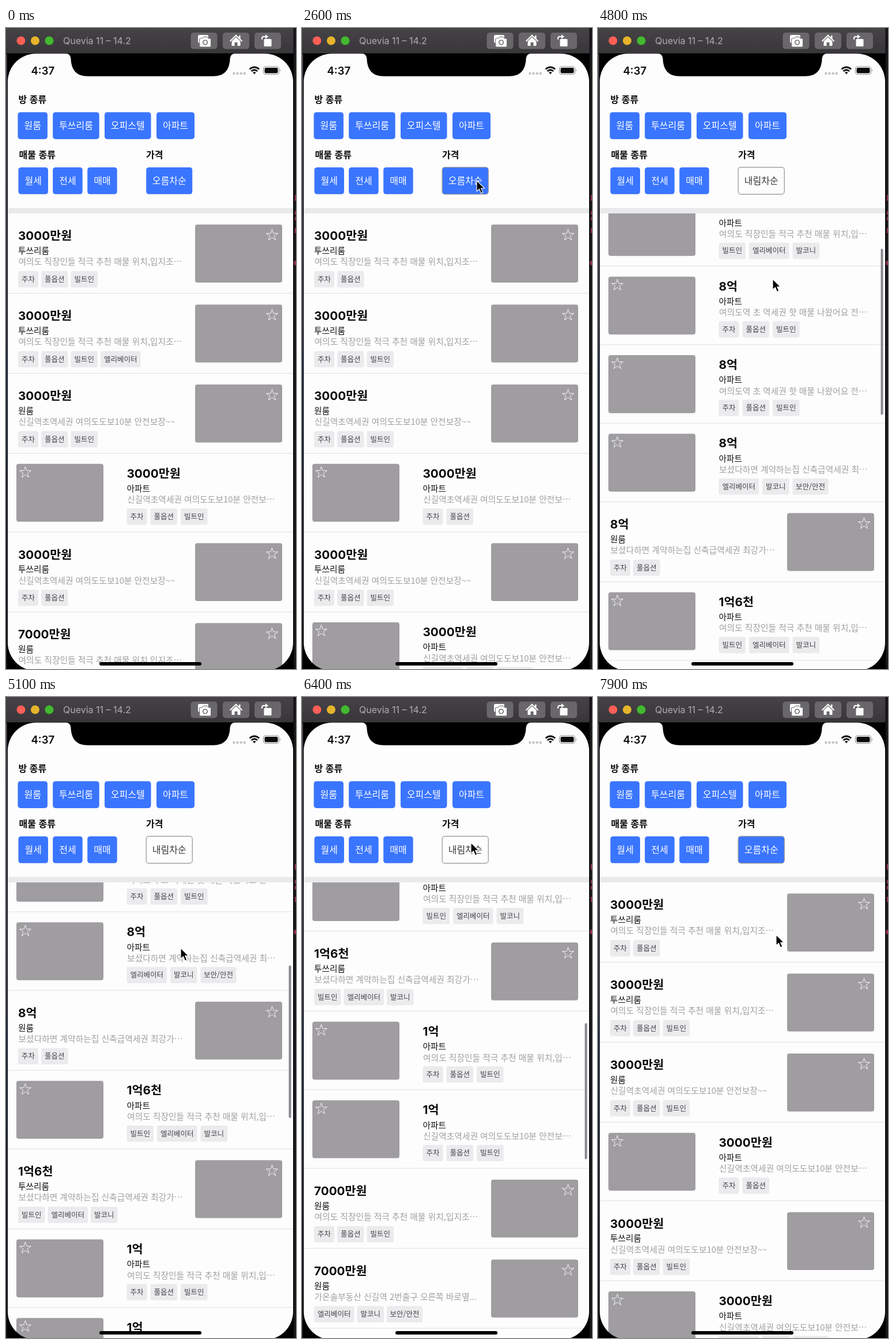
An HTML page for the animation above (8 s loop, 503 px wide and 1113 px high).

```html
<!DOCTYPE html>
<html lang="ko">
<head>
<meta charset="utf-8">
<style>
html, body { margin: 0; width: 100%; height: 100%; overflow: hidden; background: #000; }
svg { display: block; width: 100vw; height: 100vh; }
text { font-family: "Noto Sans CJK KR", "Noto Sans CJK JP", "Noto Sans CJK", sans-serif; }
.latin, .price { font-family: Inter, "Noto Sans CJK KR", "Noto Sans CJK JP", "Noto Sans CJK", sans-serif; }
.price { font-size: 20.7px; font-weight: 700; fill: #0b0b0c; }
.type { font-size: 14.7px; fill: #111; }
.desc { font-size: 14.75px; fill: #a09fa2; }
.tag { font-size: 12.5px; fill: #454547; text-anchor: middle; }
.label { font-size: 16px; font-weight: 700; fill: #0b0b0c; }
.chip { font-size: 16px; text-anchor: middle; }
</style>
</head>
<body>
<svg viewBox="0 0 503 1113" preserveAspectRatio="none">
  <defs>
    <linearGradient id="bar" x2="0" y2="1">
      <stop stop-color="#454346"/><stop offset="1" stop-color="#383639"/>
    </linearGradient>
    <linearGradient id="edge" x2="0" y2="1">
      <stop stop-color="#4a3f4b"/><stop offset=".42" stop-color="#3a3444"/>
      <stop offset=".5" stop-color="#27304a"/><stop offset="1" stop-color="#15151a"/>
    </linearGradient>
    <clipPath id="listArea"><rect x="3" y="321.7" width="495" height="792"/></clipPath>
  </defs>
  <rect width="503" height="1113"/>
  <rect x="3" y="44" width="495" height="1069" fill="#fefdfe"/>
  <g clip-path="url(#listArea)">
    <g id="lists"></g>
    <rect id="thumb" x="490.5" width="4" rx="2" fill="#89888b"/>
  </g>
  <rect x="3" y="312.5" width="495" height="9.2" fill="#e9e8ea"/>
  <g id="filters"></g>
  <rect x="162" y="1101" width="177" height="6" rx="3"/>

  <path fill-rule="evenodd" d="M0 44H503V1113H0Z M52 44.5H449A49 49 0 0 1 498 93.5V1067A49 49 0 0 1 449 1116H52A49 49 0 0 1 3 1067V93.5A49 49 0 0 1 52 44.5Z"/>
  <path d="M104 44Q112 45 112.5 54C113.5 73 122 83.7 142 83.7H359C379 83.7 387.5 73 388.5 54Q389 45 397 44Z"/>
  <rect y="45" width="2" height="1068" fill="url(#edge)"/>
  <rect x="499" width="4" height="1113" fill="#18161a"/>
  <g fill="#8d2f48">
    <path d="M501 290h2v10h-2zM501 318h2v6h-2zM501 328h2v6h-2zM501 347h2v9h-2z"/>
    <circle cx="503" cy="408" r="4"/>
  </g>

  <rect width="498.5" height="44" fill="url(#bar)"/>
  <circle cx="26" cy="22" r="7.5" fill="#fe5f57"/>
  <circle cx="50.5" cy="22" r="7.5" fill="#e6b42c"/>
  <circle cx="75" cy="22" r="7.5" fill="#43b930"/>
  <text class="latin" x="99" y="28" font-size="16" fill="#aeacaf">Quevia 11 – 14.2</text>
  <g fill="#69676a">
    <rect x="320.5" y="8" width="46" height="28.5" rx="5"/>
    <rect x="376" y="8" width="46" height="28.5" rx="5"/>
    <rect x="431" y="8" width="46" height="28.5" rx="5"/>
  </g>
  <g fill="#fff">
    <rect x="333" y="12" width="18" height="14" rx="2.5"/>
    <path d="M337.500 18h3l2-2.500h6.500l2 2.500h2.500q2 0 2 2v11q0 2-2 2h-16q-2 0-2-2v-11q0-2 2-2z" stroke="#69676a"/>
    <circle cx="345.5" cy="25" r="3.700" fill="none" stroke="#69676a" stroke-width="1.6"/>
    <path d="M388.5 23 399 13 409.500 23" fill="none" stroke="#fff" stroke-width="2"/>
    <path d="M391.5 23 399 16l7.500 7v8h-5v-6h-5v6h-5zM404 13h2.500v6l-2.500-2z"/>
    <rect x="447.5" y="19" width="13" height="13" rx="1.5"/>
    <path d="M444 20v-2q0-3 3-3h4" fill="none" stroke="#fff" stroke-width="2"/>
    <path d="M450 11l5 4-5 4z"/>
  </g>

  <text class="latin" x="43.5" y="80.5" font-size="18.5" font-weight="600" fill="#0b0b0c">4:37</text>
  <g fill="#c4c3c6">
    <circle cx="395.5" cy="79" r="2.3"/><circle cx="401.5" cy="79" r="2.3"/>
    <circle cx="407.5" cy="79" r="2.3"/><circle cx="413.5" cy="79" r="2.3"/>
  </g>
  <g fill="none" stroke="#0b0b0c" stroke-width="2.7">
    <path d="M422.5 71.5q8.300-7 16.600 0M425.5 75q5.300-4.500 10.600 0"/>
    <path d="M428 77.2q2.800-2 5.600 0l-2.800 3z" fill="#0b0b0c" stroke="none"/>
    <rect x="446.5" y="67" width="27" height="13.5" rx="4" stroke="#8b8a8d" stroke-width="1.1"/>
    <path d="M475.5 71.5q2 2.200 0 4.500z" fill="#8b8a8d" stroke="none"/>
    <rect x="448.5" y="69" width="23" height="9.5" rx="2.3" fill="#0b0b0c" stroke="none"/>
  </g>
  <path id="cursor" d="M0 0V18.5L4.400 14.500 7.500 22 10.800 20.600 7.700 13.300H13.500Z" fill="#000" stroke="#fff" stroke-width="1.1"/>
</svg>
<script>
const $ = id => document.getElementById(id);
const LOOP = 8000, STEP = 100, LIST_TOP = 321.7;

const descriptions = {
  a: ['여의도 직장인들 적극 추천 매물 위치,입지조⋯', '여의도 직장인들 적극 추천 매물 위치,입⋯'],
  b: ['신길역초역세권 여의도도보10분 안전보장~~', '신길역초역세권 여의도도보10분 안전보⋯'],
  c: ['', '여의도역 초 역세권 핫 매물 나왔어요 전⋯'],
  d: ['보셨다하면 계약하는집 신축급역세권 최강가⋯', '보셨다하면 계약하는집 신축급역세권 최⋯'],
  e: ['가온솔부동산 신길역 2번출구 오른쪽 바로옆...', '']
};
const tagNames = { 주: '주차', 풀: '풀옵션', 빌: '빌트인', 엘: '엘리베이터', 발: '발코니', 보: '보안/안전' };
const types = { 투: '투쓰리룸', 원: '원룸', 아: '아파트' };

// Each row: price, room type, description key, tag initials
const parse = s => s.trim().split(/\s*;\s*/).map(row => row.split(' '));
const tail = '7000만원 원 a 주풀빌; 7000만원 원 e 엘발보; 1억 아 b 주풀빌; 1억 아 a 주풀빌; ' +
  '1억6천 투 d 빌엘발; 1억6천 아 a 빌엘발; 8억 원 d 주풀; 8억 아 d 엘발보';
const ascending = (t1, t2, t4, t5, extra) => parse(
  `3000만원 투 a ${t1}; 3000만원 투 a ${t2}; 3000만원 원 b 주풀빌; 3000만원 아 b ${t4}; 3000만원 투 b ${t5}; ${extra}${tail}`);
const descending = (t1, t5) => parse(
  `8억 아 a ${t1}; 8억 아 c 주풀빌; 8억 아 c 주풀빌; 8억 아 d 엘발보; 8억 원 d ${t5}; ` +
  '1억6천 아 a 빌엘발; 1억6천 투 d 빌엘발; 1억 아 a 주풀빌; 1억 아 b 주풀빌; ' +
  '7000만원 원 a 주풀빌; 7000만원 원 e 엘발보; 3000만원 투 b 주풀빌; 3000만원 원 b 주풀빌');

const lists = [
  ascending('주풀빌', '주풀빌엘', '주풀빌', '주풀', ''),
  descending('빌엘발보', '주풀빌'),
  ascending('주풀', '주풀빌', '주풀', '주풀빌', '3000만원 아 b 엘발보; '),
  descending('빌엘발', '주풀')
];

// Time of each sort toggle and the list it reveals
const toggles = [[0, 0], [1000, 1], [2400, 2], [3300, 3], [6600, 2]];

const text = (cls, x, y, s, extra = '') => `<text class="${cls}" x="${x}" y="${y}" ${extra}>${s}</text>`;

function star(cx, cy) {
  const points = Array.from({ length: 10 }, (_, i) => {
    const r = i % 2 ? 4 : 10.5, a = i * Math.PI / 5;
    return `${(cx + r * Math.sin(a)).toFixed(1)},${(cy - r * Math.cos(a)).toFixed(1)}`;
  });
  return `<polygon points="${points.join(' ')}" fill="none" stroke="#f4f3f5"/>`;
}

function tagRow(x, y, initials, gap) {
  return [...initials].map(k => {
    const name = tagNames[k];
    const width = name.includes('/') ? 62 : 12 + 11.5 * name.length;
    const out = `<rect x="${x}" y="${y}" width="${width}" height="28.3" rx="3" fill="#ebeaec"/>` +
      text('tag', x + width / 2, y + 18.7, name);
    x += width + gap;
    return out;
  }).join('');
}

function listMarkup(rows) {
  let top = LIST_TOP;
  return rows.map(([price, type, key, tags]) => {
    const left = type === '아';
    const x = left ? 209.5 : 21, dy = left ? 0 : 4.6;
    const imgX = left ? 18 : 328, imgY = left ? 18.3 : 19.6;
    const height = left ? 136.4 : 138.9;
    const out = `<g transform="translate(0 ${top.toFixed(1)})">
      <rect x="${imgX}" y="${imgY}" width="151" height="100.6" rx="4" fill="#9f9da0"/>
      ${left ? star(33.5, imgY + 15) : star(461.5, imgY + 18.5)}
      ${text('price', x, 42.2 + dy, price)}
      ${text('type', x, 66.7 + dy - (left ? 0 : 0.8), types[type])}
      ${text('desc', x + .5, 86 + dy - (left ? 0 : 0.8), descriptions[key][left ? 1 : 0])}
      ${tagRow(x, 95.8 + dy, tags, left ? 6 : 5)}
      <rect x="3" y="${height - .5}" width="495" height="1" fill="#e0dfe2"/></g>`;
    top += height;
    return out;
  }).join('');
}

const chip = (x, y, w, label) =>
  `<rect x="${x}" y="${y}" width="${w}" height="46.7" rx="4.5" fill="#3a75ff"/>` +
  text('chip', x + w / 2, y + 29, label, 'fill="#fff"');

$('lists').innerHTML = lists.map(rows => `<g>${listMarkup(rows)}</g>`).join('');
$('filters').innerHTML =
  text('label', 21.5, 129.7, '방 종류') + text('label', 22.5, 225.5, '매물 종류') + text('label', 243, 225.5, '가격') +
  chip(20.5, 146.2, 51.5, '원룸') + chip(81.2, 146.2, 80.5, '투쓰리룸') + chip(171, 146.2, 80.5, '오피스텔') + chip(261, 146.2, 66, '아파트') +
  chip(21.5, 241.9, 51.5, '월세') + chip(81.2, 241.9, 51.5, '전세') + chip(141.2, 241.9, 51.5, '매매') +
  `<g id="sort">${chip(243.2, 241.9, 80, '')}</g>`;
const [sortBox, sortLabel] = $('sort').children;
const listGroups = [...$('lists').children];

const clamp = v => Math.min(1, Math.max(0, v));
const progress = (t, from, to) => clamp((t - from) / (to - from));
const smooth = p => p * p * (3 - 2 * p);

// time, x, y of the pointer tip
const pointerKeys = [
  [0, 512, 640], [900, 290, 264], [1800, 290, 264], [2200, 303, 265], [4200, 303, 265],
  [4600, 303, 436], [5100, 303, 436], [5500, 278, 522], [5900, 278, 522],
  [6400, 293, 253], [6700, 293, 253], [7100, 309, 413], [8000, 309, 413]
];

function pointer(t) {
  const i = pointerKeys.findIndex(k => k[0] > t);
  const [t0, x0, y0] = pointerKeys[i - 1], [t1, x1, y1] = pointerKeys[i];
  const p = smooth(progress(t, t0, t1));
  return [x0 + (x1 - x0) * p, y0 + (y1 - y0) * p];
}

function scrollOffset(t) {
  if (t < 5100) return 358 * progress(t, 4500, 5100) ** 3;
  if (t < 6900) return 358 + 378 * (1 - (1 - progress(t, 5100, 5700)) ** 3.22);
  return 736 * (1 - smooth(progress(t, 6900, 7600)));
}

function render(t) {
  const shown = toggles.filter(k => k[0] <= t).pop()[1];
  const offset = scrollOffset(t);
  listGroups.forEach((g, i) => g.setAttribute('display', i === shown ? 'inline' : 'none'));
  $('lists').setAttribute('transform', `translate(0 ${-offset})`);

  const isDescending = shown % 2 === 1;
  sortBox.setAttribute('fill', isDescending ? '#fefdfe' : '#3a75ff');
  sortBox.setAttribute('stroke', shown ? '#929194' : 'none');
  sortBox.setAttribute('stroke-width', 1.2);
  sortLabel.setAttribute('fill', isDescending ? '#39383a' : '#fff');
  sortLabel.textContent = isDescending ? '내림차순' : '오름차순';

  const thumb = $('thumb');
  thumb.setAttribute('y', 371.3 + .265 * offset);
  thumb.setAttribute('height', 292 - .076 * offset);
  thumb.setAttribute('opacity', progress(t, 4400, 4600) * (1 - progress(t, 7600, 7800)));

  $('cursor').setAttribute('transform', `translate(${pointer(t)})`);
}

const start = performance.now();
function tick(now) {
  const t = Math.max(0, now - start) % LOOP;
  render(Math.floor(t / STEP) * STEP);
  requestAnimationFrame(tick);
}
render(0);
requestAnimationFrame(tick);
</script>
</body>
</html>
```
